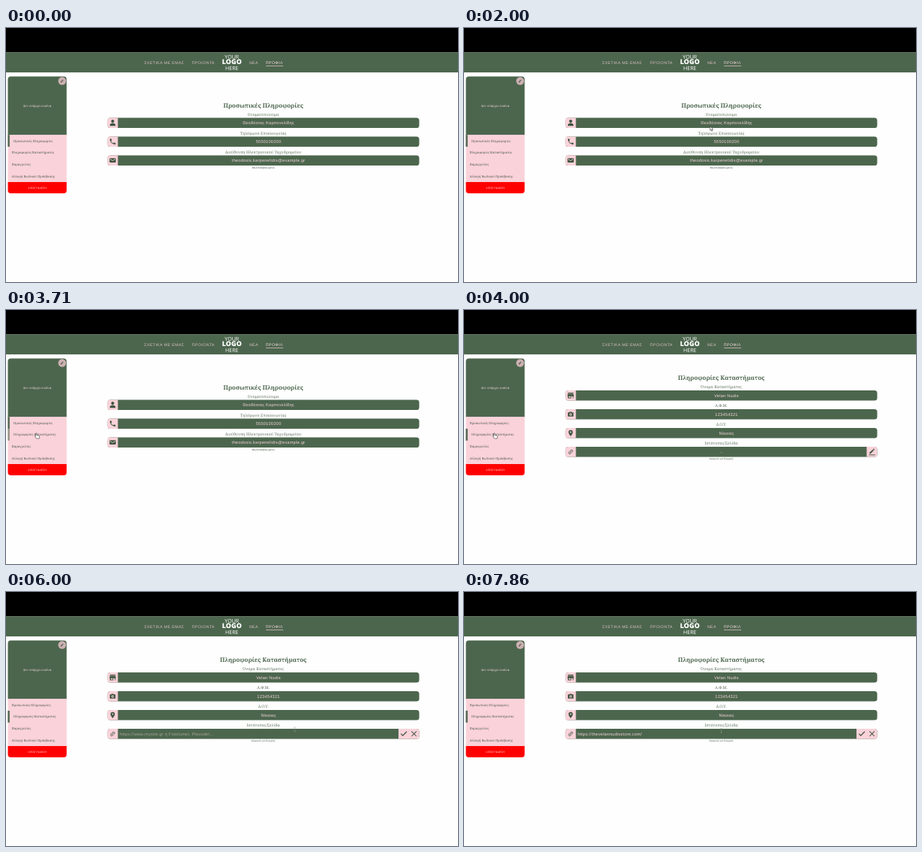
These frames come from a looping animation (600 by 338 pixels, 8 s). An HTML page:

```html
<!DOCTYPE html>
<html lang="el">
<head>
<meta charset="utf-8">
<title>Προφίλ</title>
<style>
  html, body { margin: 0; width: 100%; height: 100%; overflow: hidden; background: #fefefe; }
  svg { display: block; width: 600px; height: 338px; text-rendering: geometricPrecision; }
  .serif { font-family: "Noto Serif", serif; }
  .sans { font-family: "Liberation Sans", Arial, sans-serif; }
  .logo { font-family: "Open Sans", sans-serif; }
</style>
</head>
<body>
<svg id="stage" viewBox="0 0 600 338" xmlns="http://www.w3.org/2000/svg"></svg>
<script>
const GREEN = '#4c664d', PINK = '#fad2da', DARK = '#3f5540', LABEL = '#5b6f5c';
const LOOP = 8000, RATE = 7;
const stage = document.getElementById('stage');

function add(parent, tag, attrs, content) {
  const el = document.createElementNS('http://www.w3.org/2000/svg', tag);
  for (const name in attrs) el.setAttribute(name, attrs[name]);
  if (content) el.textContent = content;
  parent.append(el);
  return el;
}
const group = (parent = stage) => add(parent, 'g', {});
const rect = (g, x, y, width, height, fill) => add(g, 'rect', { x, y, width, height, fill });
const path = (g, d, fill, more) => add(g, 'path', { d, fill, ...more });
const text = (g, str, x, y, size, fill, more) =>
  add(g, 'text', { x, y, 'font-size': size, fill, class: 'serif', ...more }, str);
const middle = { 'text-anchor': 'middle' };
const sans = { class: 'sans', 'letter-spacing': .26 };
const show = (el, on) => el.setAttribute('visibility', on ? 'visible' : 'hidden');

const ICONS = {
  user: 'M12 12a5 5 0 1 0 0-10 5 5 0 0 0 0 10zM12 13.5c-4 0-9 1.5-9 5.5v3h18v-3c0-4-5-5.5-9-5.5z',
  phone: 'M6.6 10.8c1.4 2.8 3.8 5.1 6.6 6.6l2.2-2.2c.3-.3.7-.4 1-.2 1.1.4 2.3.6 3.6.6.6 0 1 .4 1 1V20c0 .6-.4 1-1 1C10.6 21 3 13.4 3 4c0-.6.5-1 1-1h3.5c.6 0 1 .4 1 1 0 1.3.2 2.5.6 3.6.1.3 0 .7-.2 1z',
  mail: 'M20 5H4a2 2 0 0 0-2 2v10a2 2 0 0 0 2 2h16a2 2 0 0 0 2-2V7a2 2 0 0 0-2-2zm0 4l-8 5-8-5V7l8 5 8-5z',
  store: 'M21 3H3v3h18zM22 14v-2l-1-5H3l-1 5v2h1v7h11v-7h5v7h2v-7zm-10 4.500H6V14h6z',
  badge: 'M3 6h5l1-2h6l1 2h5v13H3zM12 8.500a4 4 0 1 0 0 8 4 4 0 0 0 0-8zM12 10.500a2 2 0 1 1 0 4 2 2 0 0 1 0-4z',
  pin: 'M12 2a7 7 0 0 0-7 7c0 5.200 7 13 7 13s7-7.800 7-13a7 7 0 0 0-7-7zm0 9.500a2.500 2.500 0 0 1 0-5 2.500 2.500 0 0 1 0 5z',
  link: 'M3.900 12c0-1.700 1.400-3.100 3.100-3.100h4V7H7a5 5 0 0 0 0 10h4v-1.900H7c-1.700 0-3.100-1.400-3.100-3.100zM8 13h8v-2H8zm9-6h-4v1.900h4a3.100 3.100 0 0 1 0 6.200h-4V17h4a5 5 0 0 0 0-10z',
  pencil: 'M3 17.200V21h3.800L17.800 9.900l-3.700-3.700zM20.700 7a1 1 0 0 0 0-1.400l-2.300-2.300a1 1 0 0 0-1.400 0l-1.800 1.800 3.700 3.700z',
  check: 'M9 15.500L4.500 11l-2 2L9 19.500 22 6.500l-2-2z',
  cross: 'M20 5.500L18.500 4 12 10.500 5.500 4 4 5.500l6.500 6.500L4 18.500 5.500 20l6.500-6.500 6.500 6.500 1.500-1.500-6.500-6.500z'
};
const icon = (g, name, x, y, size = 10, turn = 0) => path(g, ICONS[name], DARK, {
  'fill-rule': 'evenodd',
  transform: `translate(${x} ${y}) rotate(${turn}) scale(${size / 24}) translate(-12 -12)`
});

// Header
rect(stage, 0, 0, 600, 32.5, '#000');
rect(stage, 0, 32.5, 600, 26.6, GREEN);
const nav = { class: 'sans', 'letter-spacing': .44 };
[['ΣΧΕΤΙΚΑ ΜΕ ΕΜΑΣ', 183.4], ['ΠΡΟΙΟΝΤΑ', 246.8], ['ΝΕΑ', 322.9]]
  .forEach(([s, x]) => text(stage, s, x, 48, 5.2, '#d9bfc0', nav));
text(stage, 'ΠΡΟΦΙΛ', 344.8, 48, 5.2, '#fbdde2', nav);
rect(stage, 345, 50.2, 23, .7, '#e9c9cd');
[['YOUR', 41.3, 7.1, 400], ['LOGO', 48.4, 9, 800], ['HERE', 55.8, 7.1, 400]].forEach(([s, y, size, weight]) =>
  text(stage, s, 299.8, y, size, '#fff', { ...middle, class: 'logo', 'font-weight': weight }));

// Sidebar
path(stage, 'M2.500 142.500V68.500a4 4 0 0 1 4-4h70a4 4 0 0 1 4 4v74z', GREEN);
rect(stage, 2.5, 142.2, 78, 63, PINK);
path(stage, 'M2.500 205h78v11a4 4 0 0 1-4 4h-70a4 4 0 0 1-4-4z', '#fe0000');
text(stage, 'Δεν υπάρχει εικόνα', 41.5, 104.9, 4.1, '#f3d3d8', middle);
add(stage, 'circle', { cx: 74.5, cy: 70.5, r: 5.2, fill: '#cdb0b2' });
icon(stage, 'pencil', 74.5, 70.5, 5);
text(stage, 'ΑΠΟΣΥΝΔΕΣΗ', 41.7, 213.8, 3.4, '#ffe3e3', { ...middle, class: 'sans', 'letter-spacing': .16 });
const items = ['Προσωπικές Πληροφορίες', 'Πληροφορίες Καταστήματος', 'Παραγγελίες', 'Αλλαγή Κωδικού Πρόσβασης']
  .map((s, i) => ({
    bar: rect(stage, 2.4, 142.2 + i * 15.75, 2.4, 15.75, GREEN),
    label: text(stage, s, 7.5, 151.6 + i * 15.75, 4.2, '#4a5a4c')
  }));

// Form pages
function row(g, y, name, label, value, center = 348.5) {
  text(g, label, 341.6, y - 2.9, 5.15, LABEL, { ...middle, 'letter-spacing': .1 });
  add(g, 'rect', { x: 134.8, y, width: 413.7, height: 13.6, rx: 3.6, fill: GREEN });
  path(g, `M148.500 ${y}h-10.200a3.500 3.500 0 0 0-3.500 3.500v6.600a3.500 3.500 0 0 0 3.500 3.500h10.200z`, PINK);
  icon(g, name, 141.6, y + 6.8, name === 'link' ? 8.5 : 10, name === 'link' ? -45 : 0);
  return text(g, value, center, y + 8.8, 5.6, '#f5d5d9', { ...middle, ...sans });
}
const heading = (g, s, y) => text(g, s, 341.5, y, 8, GREEN, { ...middle, 'font-weight': 700 });
const note = (g, s, y, size) => text(g, s, 341.4, y, size, DARK, middle);
const endCell = (g, x, y) =>
  path(g, `M${x} ${y}H545a3.500 3.500 0 0 1 3.500 3.500v6.600a3.500 3.500 0 0 1-3.500 3.500H${x}z`, PINK);

const personal = group();
heading(personal, 'Προσωπικές Πληροφορίες', 105.8);
row(personal, 119.4, 'user', 'Ονοματεπώνυμο', 'Θεοδόσιος Καρπενελίδης');
row(personal, 144.4, 'phone', 'Τηλέφωνο Επικοινωνίας', '5550100200');
row(personal, 169.4, 'mail', 'Διεύθυνση Ηλεκτρονικού Ταχυδρομείου', 'theodosis.karpenelidis@example.gr');
note(personal, 'Μη Επιβεβαιωμένη', 186.8, 3.3);

const shop = group();
heading(shop, 'Πληροφορίες Καταστήματος', 93.4);
row(shop, 107, 'store', 'Όνομα Καταστήματος', 'Velan Nudis');
row(shop, 132, 'badge', 'Α.Φ.Μ.', '123454321');
row(shop, 157, 'pin', 'Δ.Ο.Υ.', 'Νίκαιας');
const dash = row(shop, 182, 'link', 'Ιστότοπος/Σελίδα', '-', 341.5);
note(shop, 'Αναμονή για Έγκριση', 199.2, 3.1);

const viewTools = group();
endCell(viewTools, 534.5, 182);
icon(viewTools, 'pencil', 541.7, 187.8, 9);
rect(viewTools, 537.5, 192.4, 8.4, .9, DARK);

const editTools = group();
endCell(editTools, 521, 182);
icon(editTools, 'check', 528, 188.6, 10.5);
icon(editTools, 'cross', 541.6, 188.7, 11);
const input = text(editTools, '', 150.8, 190.7, 5.6, '', sans);

// Pointer shapes, each with its hot spot at 0,0
const edge = { stroke: '#333', 'stroke-width': .6, 'stroke-linejoin': 'round' };
const pointers = {
  arrow: path(stage, 'M0 0v5.600l1.300-1.100 .9 2 .9-.4-.9-1.900h1.700z', '#fff', edge),
  hand: path(stage, 'M-.7 .6Q0-.4 .7 .6V3l3 .7q.8 .3 .6 1.200L3.800 7.500H.2L-2 4.600q.2-.9 1.300-.1z', '#fff', edge),
  beam: path(stage, 'M-.9-2.800H.9M0-2.800V2.800M-.9 2.800H.9', 'none', { stroke: '#8d998b', 'stroke-width': .6 })
};

// step, x, y, shape from here on
const TRACK = [
  [8, 489, 205, 'arrow'], [10, 445, 186, 'arrow'], [13, 319.5, 126.5, 'arrow'], [15, 334, 135, 'arrow'],
  [18, 242, 141, 'arrow'], [21, 154.5, 139.5, 'arrow'], [23, 75, 149, 'hand'], [25, 43, 163, 'hand'],
  [26, 40.2, 163.5, 'hand'], [28, 40.2, 163.5, 'hand'], [29, 55, 166, 'hand'], [30, 112, 172, 'arrow'],
  [33, 430, 190, 'arrow'], [35, 537, 189, 'hand'], [36, 550, 191, 'arrow'], [37, 541, 188, 'hand'],
  [39, 541, 188, 'hand'], [40, 500, 187, 'beam'], [42, 383.3, 183, 'beam'], [43, 372, 186, 'beam'],
  [44, 358, 186, 'beam'], [45, 358, 186, 'beam'], [50, 350.5, 186, 'beam'], [51, 350.5, 186, 'beam'],
  [55, 341.5, 184.5, 'beam'], [56, 341.5, 184.5, 'beam']
];
const HOVER = 25, OPEN = 28, EDIT = 38, PASTE = 52;

function pointerAt(step) {
  const i = TRACK.findIndex((p, n) => step >= p[0] && (!TRACK[n + 1] || step < TRACK[n + 1][0]));
  if (i < 0) return null;
  const a = TRACK[i], b = TRACK[i + 1] || a;
  const f = (step - a[0]) / (b[0] - a[0] || 1);
  return { x: a[1] + (b[1] - a[1]) * f, y: a[2] + (b[2] - a[2]) * f, shape: a[3] };
}

function draw(step) {
  const opened = step >= OPEN, editing = step >= EDIT, pasted = step >= PASTE;
  show(personal, !opened);
  show(shop, opened);
  show(dash, opened && !editing);
  show(viewTools, opened && !editing);
  show(editTools, editing);
  input.textContent = pasted ? 'https://thevelannudisstore.com/' : 'https://www.mysite.gr ή Fotolumel, Plavodel...';
  input.setAttribute('fill', pasted ? '#f5d5d9' : '#a9a598');

  items.forEach(({ bar, label }, i) => {
    const active = i === (opened ? 1 : 0), hover = i === 1 && step >= HOVER;
    show(bar, active || hover);
    bar.setAttribute('opacity', active ? 1 : .6);
    label.setAttribute('x', active || hover ? 10 : 7.5);
  });

  const p = pointerAt(step);
  for (const name in pointers) show(pointers[name], p && p.shape === name);
  if (p) pointers[p.shape].setAttribute('transform', `translate(${p.x} ${p.y})`);
}

let last = -1;
function tick() {
  const step = Math.floor((performance.now() % LOOP + 5) * RATE / 1000) % (LOOP * RATE / 1000);
  if (step !== last) draw(last = step);
  requestAnimationFrame(tick);
}
tick();
</script>
</body>
</html>
```
